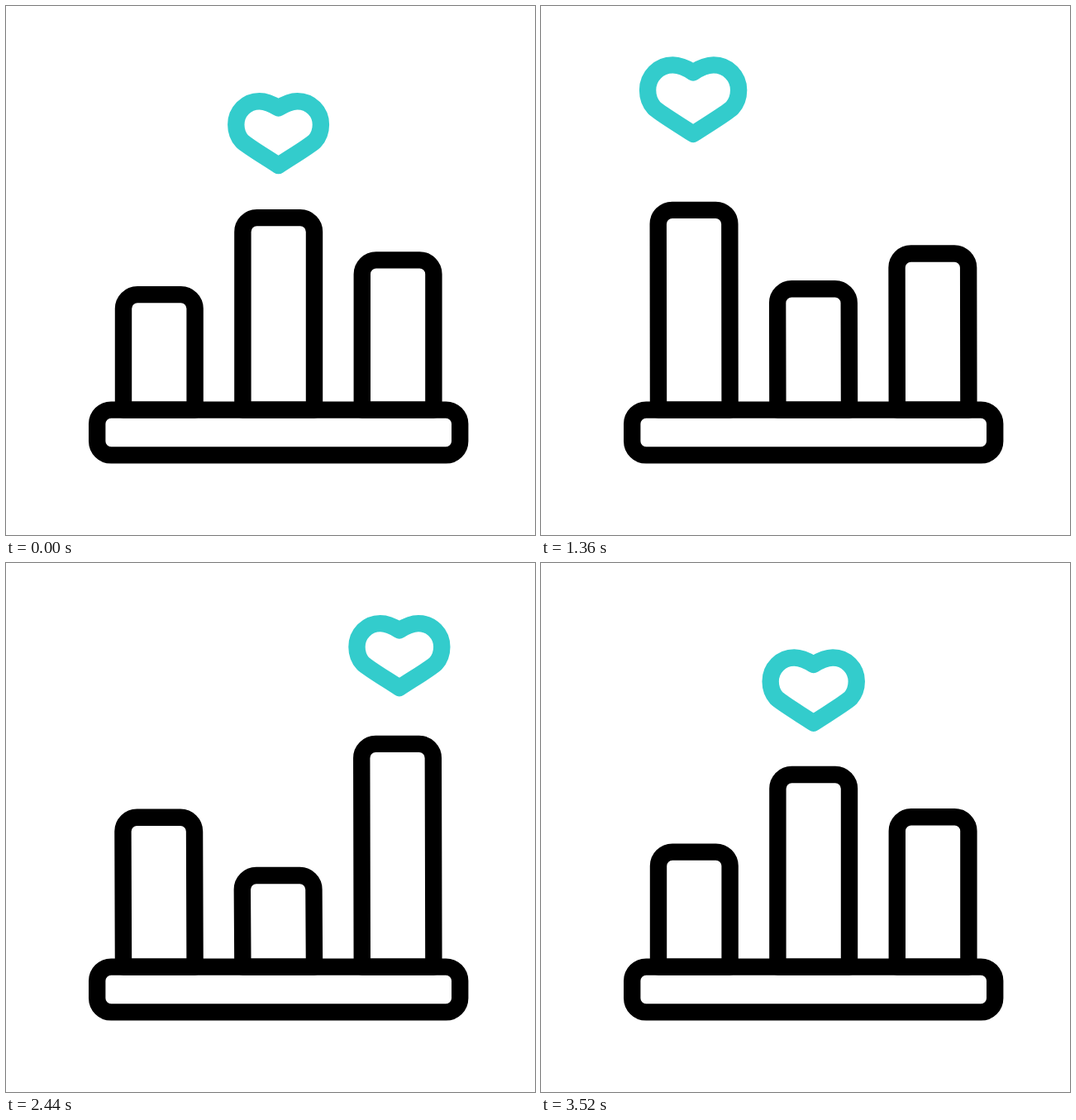
Recreate the animation shown at these times as an HTML page. Size 640 by 640 pixels, loop 3620 ms.

```html
<!DOCTYPE html>
<html lang="en">
<head>
<meta charset="utf-8">
<title>Bar chart with heart</title>
<style>
  html, body { margin: 0; width: 100%; height: 100%; overflow: hidden; background: #fff; }
  svg { display: block; width: 100vw; height: 100vh; }
  path, rect { fill: none; stroke: #000; stroke-width: 20.4; stroke-linejoin: round; }
  #heart { stroke: #3cc; vector-effect: non-scaling-stroke; }
</style>
</head>
<body>
<svg viewBox="0 0 640 640">
  <path class="bar"/>
  <path class="bar"/>
  <path class="bar"/>
  <rect x="110.2" y="488.6" width="439" height="54.8" rx="17"/>
  <path id="heart" d="M0-30.5C-7-35-14-38.8-23-38.8C-39-38.8-51.3-26-51.3-10.5
    C-51.3-2.5-48.5 4.5-44 9.5C-37 16-15 29 0 39C15 29 37 16 44 9.5
    C48.5 4.5 51.3-2.5 51.3-10.5C51.3-26 39-38.8 23-38.8C14-38.8 7-35 0-30.5Z"/>
</svg>
<script>
const LOOP = 3620;
const PEAK = 1.26, SMALL = 0.42;
const BAR_LEFT = [142, 286.4, 430.8], BAR_WIDTH = 86.6, BASE = 488.6, RADIUS = 17;

// Each stage: start time, bar tops, sideways lean of the tops, resting heart centre and its drift while growing.
const STAGES = [
  { start: 0, tops: [349.6, 256, 307.2], lean: 0, x: 329.6, y: 154, drift: 7.3 },
  { start: 1220, tops: [199.9, 306.2, 369.9], lean: 0, x: 184.1, y: 113.3, drift: 0 },
  { start: 2420, tops: [304.8, 386.7, 212.6], lean: -0.6, x: 475.9, y: 112, drift: -7 },
];

const bars = document.querySelectorAll('.bar');
const heart = document.getElementById('heart');

const mix = (a, b, k) => a + (b - a) * k;
const ramp = (t, from, to) => Math.min(1, Math.max(0, (t - from) / (to - from)));
const smooth = (t, from, to) => {
  const k = ramp(t, from, to);
  return k * k * (3 - 2 * k);
};

function drawBars(from, to, t) {
  const k = ramp(t, 0, 315);
  const lean = mix(from.lean, to.lean, k);
  bars.forEach((bar, i) => {
    const left = BAR_LEFT[i], right = left + BAR_WIDTH;
    const top = mix(from.tops[i], to.tops[i], k);
    bar.setAttribute('d', `M${left} ${BASE}L${left + lean} ${top + RADIUS}
      a${RADIUS} ${RADIUS} 0 0 1 ${RADIUS} ${-RADIUS}H${right + lean - RADIUS}
      a${RADIUS} ${RADIUS} 0 0 1 ${RADIUS} ${RADIUS}L${right} ${BASE}Z`);
  });
}

function drawHeart(from, to, t) {
  const leaving = t < 600;
  const place = leaving ? from : to;
  const scale = leaving
    ? mix(mix(1, PEAK, smooth(t, 0, 405)), SMALL, smooth(t, 405, 550))
    : mix(mix(SMALL, PEAK, smooth(t, 683, 960)), 1, smooth(t, 960, 1125));
  const opacity = leaving ? 1 - smooth(t, 400, 550) : smooth(t, 683, 930);
  const x = place.x + (scale - 1) * place.drift;
  const y = place.y - (scale - 1) * 4;
  heart.setAttribute('transform', `translate(${x} ${y}) scale(${scale})`);
  heart.setAttribute('opacity', opacity);
}

function frame() {
  const time = performance.now() % LOOP;
  const index = STAGES.findLastIndex(stage => time >= stage.start);
  const from = STAGES[index], to = STAGES[(index + 1) % STAGES.length];
  const t = time - from.start;
  drawBars(from, to, t);
  drawHeart(from, to, t);
  requestAnimationFrame(frame);
}
frame();
</script>
</body>
</html>
```
